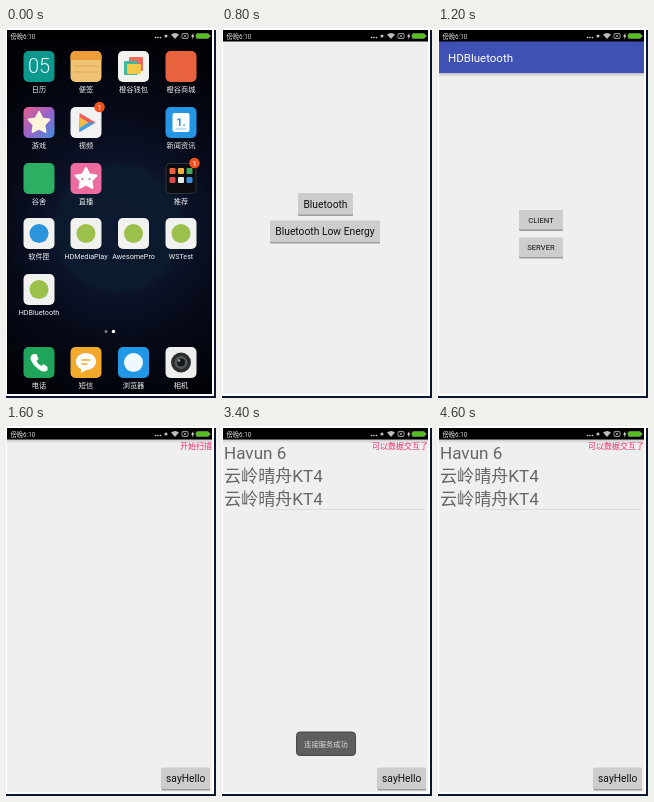
Write an HTML page that moves like this. It is 210 px wide and 370 px high and loops after 8 s.

```html
<!DOCTYPE html>
<html lang="zh">
<head>
<meta charset="utf-8">
<style>
  html, body { margin: 0; width: 100%; height: 100%; overflow: hidden; background: #fff; }
  svg { display: block; width: 210px; height: 370px; }
  text { font-family: Roboto, "Noto Sans CJK SC", "Noto Sans CJK", sans-serif; }
</style>
</head>
<body>
<svg viewBox="0 0 210 370">
  <defs>
    <radialGradient id="wall" gradientUnits="userSpaceOnUse" cx="112" cy="200" r="190">
      <stop offset="0" stop-color="#0c1830"/>
      <stop offset=".32" stop-color="#0b1a2c"/>
      <stop offset=".36" stop-color="#0c1228"/>
      <stop offset=".6" stop-color="#060a18"/>
      <stop offset="1" stop-color="#010206"/>
    </radialGradient>
    <linearGradient id="shade" x2="0" y2="1">
      <stop stop-color="#000" stop-opacity=".2"/>
      <stop offset="1" stop-color="#000" stop-opacity="0"/>
    </linearGradient>
    <linearGradient id="rainbow" x2="1" y2="1">
      <stop stop-color="#e8608c"/>
      <stop offset=".5" stop-color="#9a62c8"/>
      <stop offset="1" stop-color="#3f8fe0"/>
    </linearGradient>
    <clipPath id="screen"><path d="M1 2H206V366H1z"/></clipPath>
  </defs>
  <path d="M208 2h2v368H0v-2h208z" fill="#0b1730"/>
  <g id="stage" clip-path="url(#screen)"></g>
  <g id="status"></g>
</svg>
<script>
const LOOP = 8000, STEP = 200;
const PAGE = '#efefef';
const COLUMNS = [33, 80, 127.5, 175];

const rect = (x, y, w, h, fill, r = 0, extra = '') =>
  `<rect x="${x}" y="${y}" width="${w}" height="${h}" rx="${r}" fill="${fill}" ${extra}/>`;
const circle = (x, y, r, fill) => `<circle cx="${x}" cy="${y}" r="${r}" fill="${fill}"/>`;
const path = (d, fill, extra = '') => `<path d="${d}" fill="${fill}" ${extra}/>`;
const line = (d, color, width = 1) => path(d, 'none', `stroke="${color}" stroke-width="${width}"`);
const text = (s, x, y, size, fill, anchor = 'start', weight = 400) =>
  `<text x="${x}" y="${y}" font-size="${size}" fill="${fill}" text-anchor="${anchor}" font-weight="${weight}">${s}</text>`;
const shift = (dx, dy, body) => `<g transform="translate(${dx} ${dy})">${body}</g>`;

// Icons are drawn on a 31 x 31 tile.
const tile = (fill, body = '') => rect(0, 0, 31, 31, fill, 5) + body;
const star = (cx, cy, r, fill) => {
  const points = Array.from({ length: 10 }, (_, i) => {
    const a = i * Math.PI / 5 - Math.PI / 2, d = i % 2 ? r * .52 : r;
    return `${cx + d * Math.cos(a)},${cy + d * Math.sin(a)}`;
  });
  return `<polygon points="${points.join(' ')}" fill="${fill}" stroke="${fill}" stroke-width="2" stroke-linejoin="round"/>`;
};
const badge = circle(29, 0, 5.3, '#f4511e') + text('1', 29, 2.6, 7.5, '#fff', 'middle');
const dot = color => tile('#f1f1ef', circle(15.5, 15.5, 9.5, color));
const greenApp = dot('#9bc04b');

const icons = {
  calendar: tile('#0d988e', text('05', 15.5, 22, 20, '#e8fffb', 'middle', 300)),
  notes: tile('#efc274', path('M0 9V5a5 5 0 0 1 5-5h21a5 5 0 0 1 5 5v4z', '#ed9c3b') +
    line('M4 15H27M4 21H27', '#dda957')),
  wallet: tile('#f2f2ee', rect(11, 6, 14, 14, '#ef6a5d', 1) + rect(6, 10, 14, 14, '#3fb79b', 1) +
    rect(9, 13, 14, 10, '#f3c94c', 1)),
  shop: tile('#e8623d'),
  games: tile('url(#rainbow)', star(15.5, 16, 11, '#fff3da')),
  video: tile('#f2f2f2', path('M9 6L25 15.5L9 25z', '#ef5b57') + path('M9 15.5H25L9 25z', '#3fa0e6') +
    path('M9 10L18 15.5L9 21z', '#f6b941')) + badge,
  news: tile('#2496e4', rect(7, 6, 17, 19, '#fff', 2) + text('1.', 15.5, 19, 11, '#2496e4', 'middle', 700) +
    line('M10 22H21', '#8cc6f0')),
  home: tile('#2cae63'),
  live: tile('#ec6c9f', star(15.5, 16, 11, '#fff') + circle(12, 16, 1, '#d3507f') + circle(19, 16, 1, '#d3507f')),
  folder: rect(.5, .5, 30, 30, '#0b0d12', 4, 'stroke="#30343a"') +
    ['#e8623d', '#f0b040', '#42a85c', '#d84d48', '#e6e6e6', '#3a8dde'].map((c, i) =>
      rect(4 + i % 3 * 8.5, 5 + (i / 3 | 0) * 9, 6, 6, c, 1)).join('') + badge,
  store: dot('#2a94dc'),
  green: greenApp,
  phone: tile('#1fa65a', path('M10 7l3 0 2 5-2 2q2 4 5 5l2-2 4 3v3q-3 3-8 0-7-5-9-11 0-4 3-5z', '#fff')),
  sms: tile('#f2a92c', path('M15.5 6c6 0 10 4 10 8.500s-4 8.500-10 8.500l-5 3v-4q-5-2-5-7.500c0-4.500 4-8.500 10-8.500z', '#fff') +
    line('M11 13H20M11 17H17', '#f2a92c', 1.5)),
  browser: tile('#2297e6', circle(15.5, 15.5, 9.5, '#eef8ff')),
  camera: tile('#eeeeec', circle(15.5, 15.5, 10, '#2c2e30') + circle(15.5, 15.5, 6.500, '#55585b') +
    circle(15.5, 15.5, 4, '#15171a') + circle(13.500, 13.500, 1.300, '#9aa')),
};

const rows = [
  [23, ['calendar', '日历'], ['notes', '便签'], ['wallet', '橙谷钱包'], ['shop', '橙谷商城']],
  [79, ['games', '游戏'], ['video', '视频'], null, ['news', '新闻资讯']],
  [135, ['home', '谷舍'], ['live', '直播'], null, ['folder', '推荐']],
  [190, ['store', '软件匣'], ['green', 'HDMediaPlay'], ['green', 'AwesomePro'], ['green', 'WSTest']],
  [246, ['green', 'HDBluetooth']],
  [319, ['phone', '电话'], ['sms', '短信'], ['browser', '浏览器'], ['camera', '相机']],
];

const launcher = rect(1, 2, 205, 364, 'url(#wall)') +
  rows.map(([top, ...apps]) => apps.map((app, i) => app
    ? shift(COLUMNS[i] - 15.5, top, icons[app[0]]) +
      text(app[1], COLUMNS[i], top + 41, 7.2, '#f2f2f2', 'middle')
    : '').join('')).join('') +
  circle(100, 303.500, 1.500, '#777') + circle(107.500, 303.500, 1.700, '#fff');

const button = (label, x, y, w, h, size = 10.3) =>
  rect(x, y + 1, w, h, '#9c9c9c', 1) + rect(x, y, w, h - .5, '#cdcdcd', 1) +
  text(label, x + w / 2, y + h / 2 + size * .36, size, '#111', 'middle');
const page = body => rect(1, 13, 205, 354, PAGE) + body;

const menuPage = page(
  button('Bluetooth', 76, 165, 55, 22) +
  button('Bluetooth Low Energy', 48, 192.500, 110, 22));

const rolePage = page(
  rect(1, 13, 205, 32, '#3f51b5') + rect(1, 45, 205, 4, 'url(#shade)') +
  text('HDBluetooth', 10, 34, 11.5, '#fff') +
  button('CLIENT', 81, 182, 44, 20, 7.7) + button('SERVER', 81, 209.500, 44, 20, 7.7));

const devices = ['Havun 6', '云岭晴舟KT4', '云岭晴舟KT4'];
const scanPage = (count, state) => page(
  rect(1, 13, 205, 4, 'url(#shade)') +
  devices.slice(0, count).map((name, i) => text(name, 2, 32.500 + i * 23.2, 17.1, '#666')).join('') +
  (count > 2 ? line('M42 83.500H203', '#dcdcdc') : '') +
  text(state, 206, 22.500, 8, '#ee2a6b', 'end') +
  button('sayHello', 155.5, 341.500, 48.500, 22));

const push = (from, to) =>
  shift(-23, 0, from) + rect(1, 13, 97, 354, '#000', 0, 'opacity=".2"') + shift(97, 0, to);

const toast = (label, width, y, opacity = 1) => `<g opacity="${opacity}">` +
  rect(104 - width / 2, y, width, 23.500, '#5e5e5e', 3.500, 'stroke="#484848"') +
  text(label, 104, y + 14.500, 7.3, '#ddd', 'middle') + '</g>';

function scene(t) {
  if (t < 600) return launcher;
  if (t < 800) return launcher + rect(1, 40, 205, 314, PAGE);
  if (t < 1000) return menuPage;
  if (t < 1200) return push(menuPage, rolePage);
  if (t < 1400) return rolePage;
  if (t < 1600) return push(rolePage, scanPage(0, '开始扫描'));

  const count = t < 2200 ? 0 : t < 2400 ? 2 : 3;
  const state = t < 2600 ? '开始扫描' : t < 2800 ? '扫描结束' : t < 3000 ? '开始连接' : '可以数据交互了';
  let popup = '';
  if (t >= 3400 && t < 3800) popup = toast('连接服务成功', 59, 306);
  if (t >= 4000 && t < 4600) popup = toast('sayHello from service', 83, t < 4200 ? 302.500 : 306, t < 4400 ? 1 : .5);
  return scanPage(count, state) + popup;
}

const gray = '#bbb';
document.getElementById('status').innerHTML =
  rect(1, 2, 205, 11.500, '#000') + text('傍晚6:10', 4.500, 10.600, 6.3, '#ddd') +
  [149.500, 152, 154.500].map(x => circle(x, 9.500, .8, '#ddd')).join('') +
  circle(160, 8, 1.600, gray) +
  path('M165 6.500Q169 3.500 173 6.500L169 11z', gray) +
  rect(176, 5.500, 6, 5, 'none', 1, `stroke="${gray}" stroke-width=".8"`) +
  line('M177.500 6.500l3 3m0-3l-3 3', gray, .7) +
  path('M187.500 5l-2.500 3.500h1.500l-.5 3 2.500-4h-1.500z', '#ddd') +
  rect(190, 5.500, 13, 5, '#55c01c', 1.500, 'stroke="#8a8" stroke-width=".5"') + rect(203.300, 7, 1, 2, gray);

const stage = document.getElementById('stage');
let shown = -1;
function tick() {
  const step = Math.floor(performance.now() % LOOP / STEP);
  if (step !== shown) stage.innerHTML = scene((shown = step) * STEP);
  requestAnimationFrame(tick);
}
tick();
</script>
</body>
</html>
```
